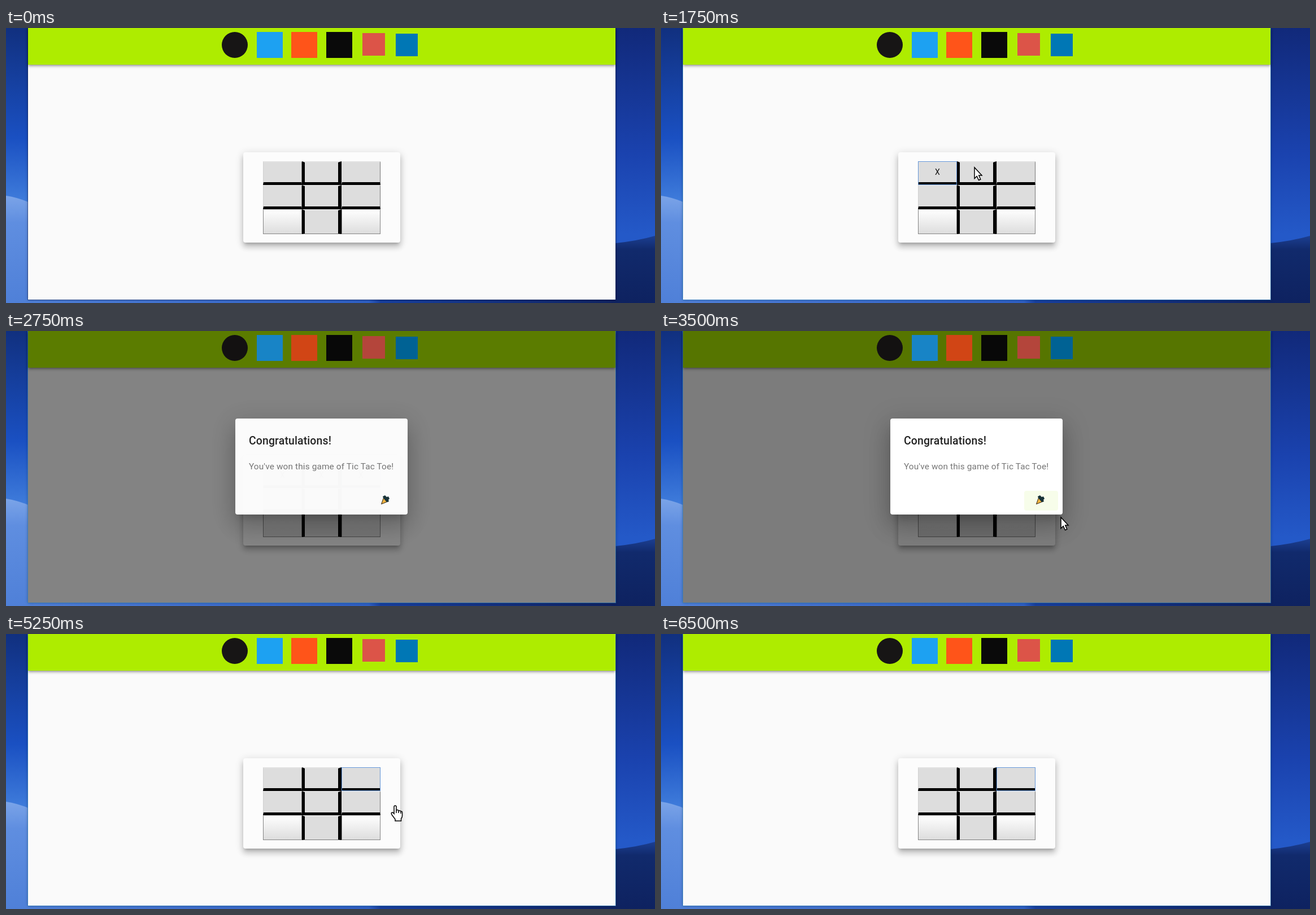
Write an HTML page that moves like this. It is 1149 px wide and 487 px high and loops after 6750 ms.

```html
<!DOCTYPE html>
<html lang="en">
<head>
<meta charset="utf-8">
<title>Tic Tac Toe</title>
<style>
html, body { margin: 0; width: 100%; height: 100%; overflow: hidden; background: #143a9c; }
#stage, #stage * { position: absolute; box-sizing: border-box; }
#stage { width: 1149px; height: 487px; overflow: hidden; font-family: Roboto, sans-serif; }
.layer { left: 0; top: 0; width: 1149px; height: 487px; }
#page { left: 39px; top: 0; width: 1040px; height: 481px; background: #fafafa;
  box-shadow: 0 0 0 1px rgba(10, 30, 80, .45), 0 0 5px rgba(0, 0, 30, .4); }
#page.active { box-shadow: 0 0 0 1px rgba(50, 130, 190, .7), 0 0 5px rgba(0, 0, 30, .4); }
#bar { left: 0; top: 0; width: 1040px; height: 65px; background: #aeec00;
  box-shadow: 0 2px 4px -1px rgba(0, 0, 0, .3), 0 3px 5px rgba(0, 0, 0, .2); }
#card { left: 420px; top: 220px; width: 278px; height: 160px; border-radius: 4px; background: #fcfcfc;
  box-shadow: 0 5px 5px -3px rgba(0, 0, 0, .2), 0 8px 10px 1px rgba(0, 0, 0, .14), 0 3px 14px 2px rgba(0, 0, 0, .12); }
.cell { background: #ddd; border: 1px solid; border-top-width: 2px;
  border-color: #e2e2e2 #777 #000 #d0d0d0; font-size: 14px; color: #111; }
.cell b { left: 0; right: 0; top: 9px; text-align: center; font-weight: 400; }
.row0, .row1 { border-bottom-width: 5px; }
.row2 { border-bottom-color: #777; }
.col1 { border-left: 5px solid #000; border-right: 6px solid #000; }
.row2:not(.col1) { border: 1px solid #858585; border-top-color: #ddd; background: linear-gradient(#fbfbfb 10%, #ddd); }
.focus { outline: 1px solid #6496d8; outline-offset: -1px; }
#shade { left: 39px; top: 0; width: 1040px; height: 481px; background: #000; }
#modal { left: 406px; top: 155px; width: 305px; height: 170px; border-radius: 4px; background: #fff;
  box-shadow: 0 11px 15px -7px rgba(0, 0, 0, .2), 0 24px 38px 3px rgba(0, 0, 0, .14), 0 9px 46px 8px rgba(0, 0, 0, .12); }
#modal span { left: 24px; white-space: nowrap; }
#title { top: 28px; font-size: 19.4px; font-weight: 500; letter-spacing: .0075em; color: rgba(0, 0, 0, .87); }
#message { top: 76px; font-size: 15.35px; letter-spacing: .00938em; color: rgba(0, 0, 0, .54); }
#button { left: 237px; top: 128px; width: 60px; height: 35px; border-radius: 4px; }
#popper { left: 257px; top: 135px; }
.cursor { left: 0; top: 0; overflow: visible; fill: #fff; stroke: #000; stroke-width: 1.5; }
</style>
</head>
<body>
<div id="stage">
  <svg class="layer" viewBox="0 0 1149 487">
    <defs>
      <linearGradient id="left" x2="0" y2="1">
        <stop stop-color="#11307f"/><stop offset=".4" stop-color="#1a50c2"/><stop offset=".63" stop-color="#3f7cdb"/>
      </linearGradient>
      <linearGradient id="leftLow" x2="0" y2="1">
        <stop stop-color="#7ba4e8"/><stop offset=".25" stop-color="#5f8ee0"/><stop offset="1" stop-color="#4f80d8"/>
      </linearGradient>
      <linearGradient id="right" x2="0" y2="1">
        <stop stop-color="#11297a"/><stop offset=".45" stop-color="#1a42ae"/><stop offset=".75" stop-color="#2459c8"/>
      </linearGradient>
      <linearGradient id="rightLow" x2="0" y2="1">
        <stop stop-color="#1c3f92"/><stop offset=".2" stop-color="#112a6c"/><stop offset="1" stop-color="#0e2260"/>
      </linearGradient>
      <linearGradient id="floor">
        <stop stop-color="#4f80d8"/><stop offset=".58" stop-color="#2e5fc4"/>
        <stop offset=".6" stop-color="#173f9e"/><stop offset="1" stop-color="#0e2260"/>
      </linearGradient>
    </defs>
    <path fill="url(#left)" d="M0 0H39V487H0z"/>
    <path fill="url(#leftLow)" d="M0 297Q20 300 39 308V487H0z"/>
    <path fill="url(#right)" d="M1079 0H1149V487H1079z"/>
    <path fill="url(#rightLow)" d="M1079 381Q1118 377 1149 368V487H1079z"/>
    <path fill="url(#floor)" d="M38 481H1080V487H38z"/>
  </svg>
  <div id="page"><div id="bar"></div></div>
  <div id="card"></div>
  <div id="grid"></div>
  <div id="shade"></div>
  <svg id="icons" class="layer" viewBox="0 0 1149 487">
    <circle cx="405" cy="30" r="23" fill="#171515"/>
    <path fill="#1da1f2" d="M444 7h46v46h-46z"/>
    <path fill="#ff5419" d="M505 7h46v46h-46z"/>
    <path fill="#0a0a0a" d="M567 7h46v46h-46z"/>
    <path fill="#dc5448" d="M631 9h40v40h-40z"/>
    <path fill="#0077b5" d="M690 10h39v40h-39z"/>
  </svg>
  <div id="modal">
    <span id="title">Congratulations!</span>
    <span id="message">You've won this game of Tic Tac Toe!</span>
    <div id="button"></div>
    <svg id="popper" width="17" height="18">
      <path d="M1.5 16.5 6 4l7 8z" fill="#f5b63f" stroke="#2a2112" stroke-linejoin="round"/>
      <path d="M4 3 8 1l3 3 3-1 2 4-2 2 1 3-4 1-6-7z" fill="#173237"/>
    </svg>
  </div>
  <svg id="arrow" class="cursor" width="15" height="25">
    <path d="M1 1V20.5L5.2 16.5 8.5 23.5 11.8 22 8.7 15H14z"/>
  </svg>
  <svg id="hand" class="cursor" width="22" height="29">
    <path d="M6 15V3Q6 1 8 1T10 3V9Q13 7.500 14 10 17 9 18 11 20.500 10.500 20.500 13V19Q20.500 22 18.500 24V28H8V25L2 17Q0 13 3 13 5 13.500 6 15zM10 9V14M14 10V14M18 11V15"/>
  </svg>
</div>
<script>
const LOOP = 6750, STEP = 250;
const $ = id => document.getElementById(id);
const between = (t, from, to) => t >= from && t < to;
const show = (el, on) => { el.style.visibility = on ? 'visible' : 'hidden'; };

const xs = [455, 524, 594, 663], ys = [236, 278, 321, 365];
const cells = [];
for (let row = 0; row < 3; row++) for (let col = 0; col < 3; col++) {
  const cell = document.createElement('div');
  cell.className = `cell row${row} col${col}`;
  Object.assign(cell.style, {
    left: xs[col] + 'px', top: ys[row] + 'px',
    width: xs[col + 1] - xs[col] + 'px', height: ys[row + 1] - ys[row] + 'px'
  });
  cell.append(document.createElement('b'));
  $('grid').append(cell);
  cells.push(cell);
}

// Pointer stops: start time, x, y, shape (no shape = hidden)
const stops = [
  [0], [500, 512, 318, 'arrow'], [750, 477, 242, 'arrow'], [1000, 478, 249, 'arrow'],
  [1500, 517, 246, 'arrow'], [1750, 554, 246, 'arrow'], [2000, 548, 247, 'arrow'],
  [2250, 632, 246, 'arrow'], [2500, 643, 246, 'arrow'], [2750],
  [3250, 707, 324, 'arrow'], [3500, 707, 329, 'arrow'], [3750, 681, 309, 'hand'],
  [4000, 681, 303, 'hand'], [5500, 668, 298, 'arrow'], [5750, 481, 247, 'arrow'],
  [6000, 501, 421, 'arrow'], [6250, 550, 463, 'arrow'], [6500]
];
const clicks = [1250, 2000, 2750], focuses = [1250, 2000, 2500, Infinity];

function draw(now) {
  const t = Math.floor(now % LOOP / STEP) * STEP;
  const open = between(t, 2750, 5250), opening = t === 2750;

  $('page').classList.toggle('active', t >= 1250);
  clicks.forEach((start, i) => {
    cells[i].firstChild.textContent = between(t, start, 5250) ? 'X' : '';
    cells[i].classList.toggle('focus', between(t, focuses[i], focuses[i + 1]));
  });

  $('shade').style.opacity = open ? (opening ? .48 : .5) : 0;
  $('icons').style.filter = open ? 'brightness(.82)' : 'none';
  show($('modal'), open);
  $('modal').style.opacity = opening ? .97 : 1;
  $('button').style.background = t >= 3500 ? '#f7fdea' : 'none';

  const [, x, y, shape] = stops.findLast(stop => stop[0] <= t);
  for (const id of ['arrow', 'hand']) {
    show($(id), id === shape);
    if (id === shape) $(id).style.transform = `translate(${x}px, ${y}px)`;
  }
  requestAnimationFrame(draw);
}
requestAnimationFrame(draw);
</script>
</body>
</html>
```
